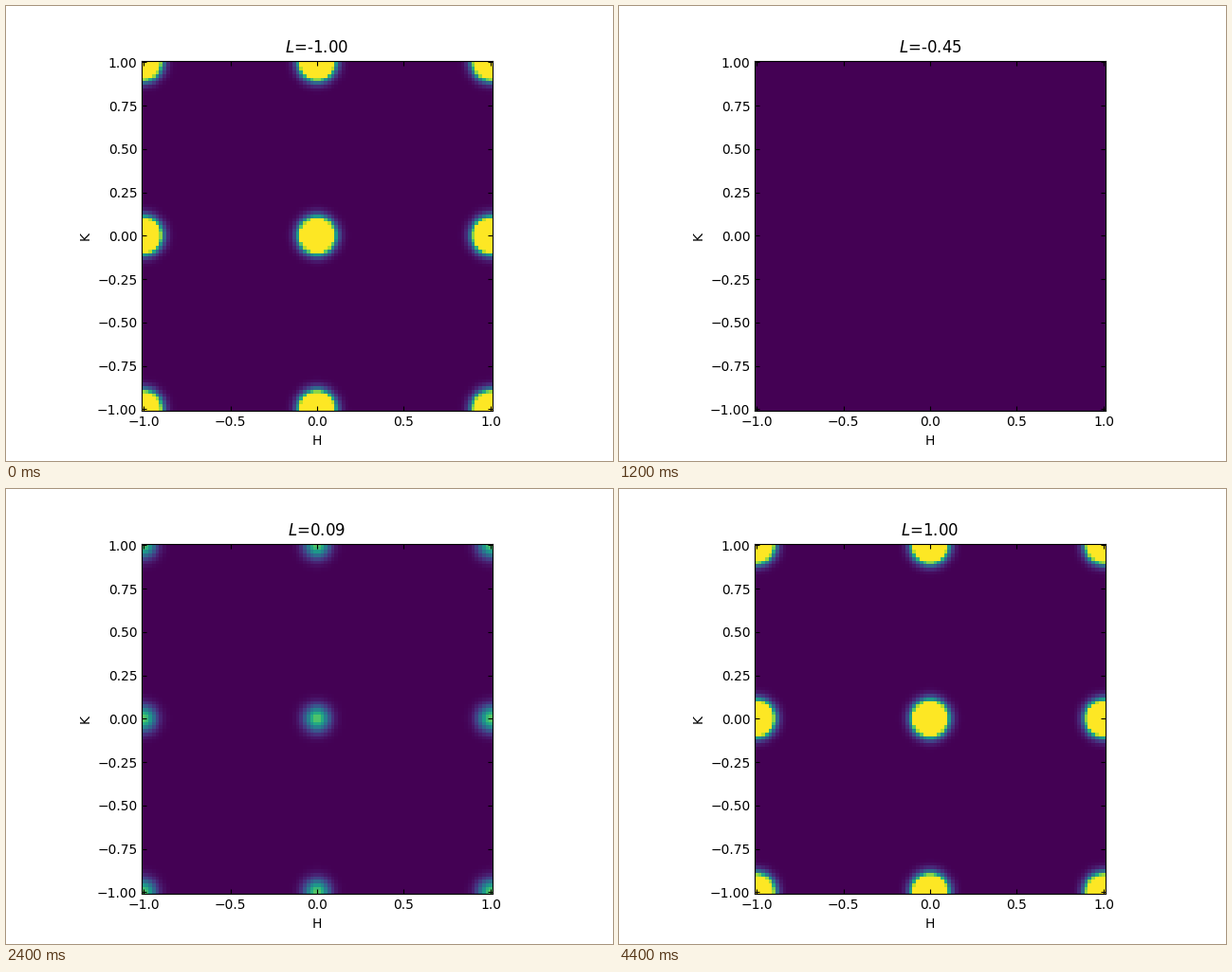
A matplotlib script that plays this animation: 640 px wide and 480 px high, repeating every 4.5 s.

```python
import numpy as np
import matplotlib.pyplot as plt
from matplotlib.animation import FuncAnimation

FRAMES = 45
CELLS = 100
PEAK = 6.5       # intensity at a lattice point, colours saturate at 1
SIGMA = 0.05     # in-plane width of a spot

plt.rcParams.update({
    "font.family": "DejaVu Sans",
    "xtick.direction": "in", "ytick.direction": "in",
    "xtick.top": True, "ytick.right": True,
})

axis = np.linspace(-1, 1, CELLS)
levels = np.linspace(-1, 1, FRAMES)


def offset(q):
    """Distance to the nearest integer."""
    return np.abs(q - np.round(q))


row = np.exp(-offset(axis) ** 2 / (2 * SIGMA ** 2))
spots = PEAK * np.outer(row, row)


def section(l):
    return spots * np.exp(-2.16 * (offset(l) / 0.0909) ** 1.34)


fig, ax = plt.subplots(figsize=(6.4, 4.8), dpi=100)
edge = 1 + 1 / (CELLS - 1)
image = ax.imshow(section(levels[0]), origin="lower", cmap="viridis",
                  vmin=0, vmax=1, interpolation="nearest",
                  extent=(-edge, edge, -edge, edge))
ax.set_xlabel("H")
ax.set_ylabel("K")
title = ax.set_title("")


def update(i):
    image.set_data(section(levels[i]))
    title.set_text(f"$L$={levels[i]:.2f}")
    return image, title


anim = FuncAnimation(fig, update, frames=FRAMES, interval=100,
                     repeat=True, repeat_delay=0, blit=False)
plt.show()
```
